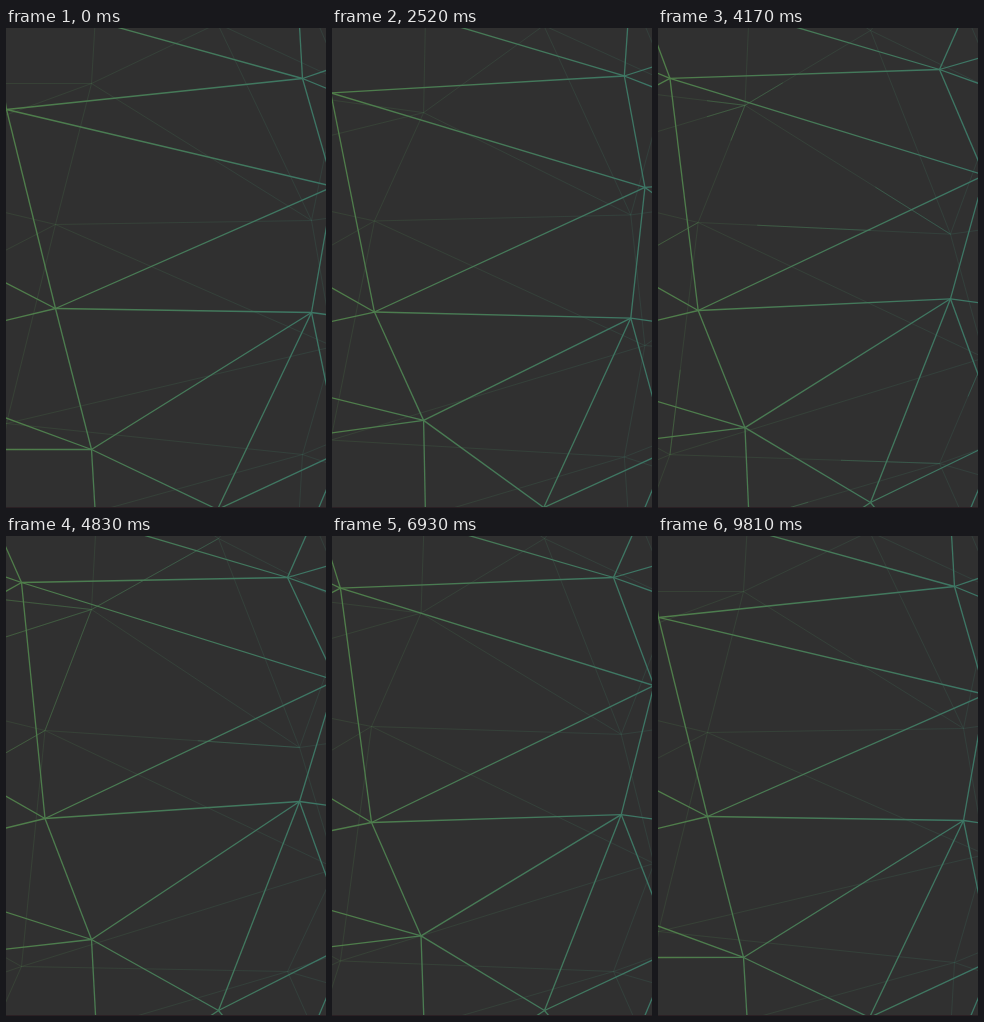
Animation, 320 px wide and 480 px high, one loop 9840 ms. Source, as an HTML page with a canvas:

```html
<!DOCTYPE html>
<html lang="en">
<head>
<meta charset="utf-8">
<title>Drifting mesh</title>
<style>
  html, body { margin: 0; width: 100%; height: 100%; overflow: hidden; background: #303030; }
  canvas { display: block; width: 320px; height: 480px; }
</style>
</head>
<body>
<canvas id="stage" width="320" height="480"></canvas>
<script>
const ctx = document.getElementById('stage').getContext('2d');
const W = 320, H = 480, LOOP = 9840, MIRROR = 476;

const clamp = v => Math.max(0, Math.min(1, v));
const ramp = (t, a, b) => {
  const u = clamp((t - a) / (b - a));
  return u * u * (3 - 2 * u);
};
const bump = (t, a, peak, b) => ramp(t, a, peak) - ramp(t, peak, b);

// Four slow movements that all points share, each in its own measure
const moves = t => ({
  settle: 1 - ramp(t, 0, 1900) + ramp(t, 8340, LOOP),
  shift: ramp(t, 2000, 3500) - ramp(t, 7000, 9000),
  crest: bump(t, 3000, 4830, 9000),
  sway: bump(t, 0, 1440, 3300) + bump(t, 5000, 6930, 7700) - bump(t, 7000, 8310, LOOP)
});

// A home position, and how far each movement carries the point
const point = (x, y, reach = {}) => m => {
  let px = x, py = y;
  for (const k in reach) {
    px += reach[k][0] * m[k];
    py += reach[k][1] * m[k];
  }
  return [px, py];
};
const beside = (node, dx, dy) => m => {
  const [x, y] = node(m);
  return [x + dx, y + dy];
};

const A = point(-3, 67, { settle: [3, 14], shift: [6, -8], crest: [12, -13], sway: [-1, -1] });
const B = point(296, 50, { shift: [-15, -9] });
const C = point(311.5, 161, { settle: [15.5, -3], shift: [6, -8], crest: [12, -9], sway: [-2, 0.5] });
const D = point(42.5, 282, { settle: [6.5, -2], crest: [-4, 0], sway: [-1.5, 4] });
const E = point(303, 290, { settle: [2, -6], shift: [-13.5, -7], crest: [3.5, -18], sway: [-2.5, 4] });
const F = point(91, 391, { settle: [-6, 30], shift: [-1, -1], crest: [-5, 13], sway: [1, 3] });
const G = point(211, 481, { shift: [1, -7] });

// Each node with the ends of its lines that leave the stage
const rays = [
  [A, point(-16, -24), point(-60, 20), point(-60, 88)],
  [B, point(63, -20, { settle: [-20, 0], shift: [11, 0], sway: [-3, 0] }),
    point(292, -20, { shift: [16, 0] }),
    point(340, 35, { shift: [0, -11] }),
    point(340, 68, { shift: [0, -6] })],
  [C, beside(C, 100, -8), beside(C, 100, 70)],
  [D, point(-100, 203), point(-60, 306)],
  [E, beside(E, 100, 14),
    point(340, 448, { settle: [0, 6], shift: [0, -32], crest: [0, -20], sway: [0, 4] })],
  [F, point(-40, 359, { settle: [0, 16], shift: [0, -2], crest: [0, 6], sway: [0, 3] }),
    point(-40, 409, { settle: [0, 12], crest: [0, 8], sway: [0, 2] }),
    point(95, 590)],
  [G, point(340, 421, { shift: [0, -2], crest: [0, -10] }), beside(G, -36, 24), beside(G, 20, 24)],
  [point(312, 480), point(328, 442)]
].flatMap(([node, ...ends]) => ends.map(end => [node, end]));

const links = [
  [A, B], [A, C], [A, D], [B, C], [C, D], [C, E],
  [D, E], [D, F], [E, F], [E, G], [F, G]
];
const edges = [...links, ...rays];
const raysOf = (node, a, b) => rays.filter(r => r[0] === node).slice(a, b);

// Light that runs along some lines of the back layer
const glows = [
  { lines: [[D, E]], on: 2940, off: 3750, time: 1800 },
  { lines: [[F, E], [D, A], [A, B], [B, C], ...raysOf(B, 0, 1), ...raysOf(E, 0, 1), ...raysOf(F, 2)],
    on: 2600, off: 3600, time: 900 },
  { lines: [[F, D], [F, G], ...raysOf(F, 0, 2), ...raysOf(D, 0, 1)],
    on: 3900, off: 4900, time: 900 }
];

const ink = ctx.createLinearGradient(0, 0, W, 0);
ink.addColorStop(0, '#507e49');
ink.addColorStop(1, '#3c7666');

function line([a, b], m, from = 0, to = 1) {
  const [ax, ay] = a(m), [bx, by] = b(m);
  const dx = bx - ax, dy = by - ay;
  ctx.beginPath();
  ctx.moveTo(ax + dx * from, ay + dy * from);
  ctx.lineTo(ax + dx * to, ay + dy * to);
  ctx.stroke();
}

function mesh(m, alpha, width) {
  ctx.globalAlpha = alpha;
  ctx.lineWidth = width;
  for (const e of edges) line(e, m);
}

function glow(m, t) {
  ctx.globalAlpha = 0.42;
  for (const { lines, on, off, time } of glows) {
    const head = clamp((t - on) / time), tail = clamp((t - off) / time);
    if (head > tail) for (const e of lines) line(e, m, tail, head);
  }
}

function draw(t) {
  const m = moves(t);
  ctx.globalAlpha = 1;
  ctx.fillStyle = '#303030';
  ctx.fillRect(0, 0, W, H);
  ctx.strokeStyle = ink;

  ctx.save();
  ctx.translate(0.5, MIRROR + 0.5);
  ctx.scale(1, -1);
  mesh(m, 0.22, 1);
  glow(m, t);
  ctx.restore();

  ctx.save();
  ctx.translate(0.5, 0.5);
  mesh(m, 1, 1.3);
  ctx.restore();

  ctx.globalAlpha = 1;
  ctx.fillStyle = '#2b2024';
  ctx.fillRect(0, H - 1, W, 1);
}

const start = performance.now();
function tick() {
  draw((performance.now() - start) % LOOP);
  requestAnimationFrame(tick);
}
tick();
</script>
</body>
</html>
```
